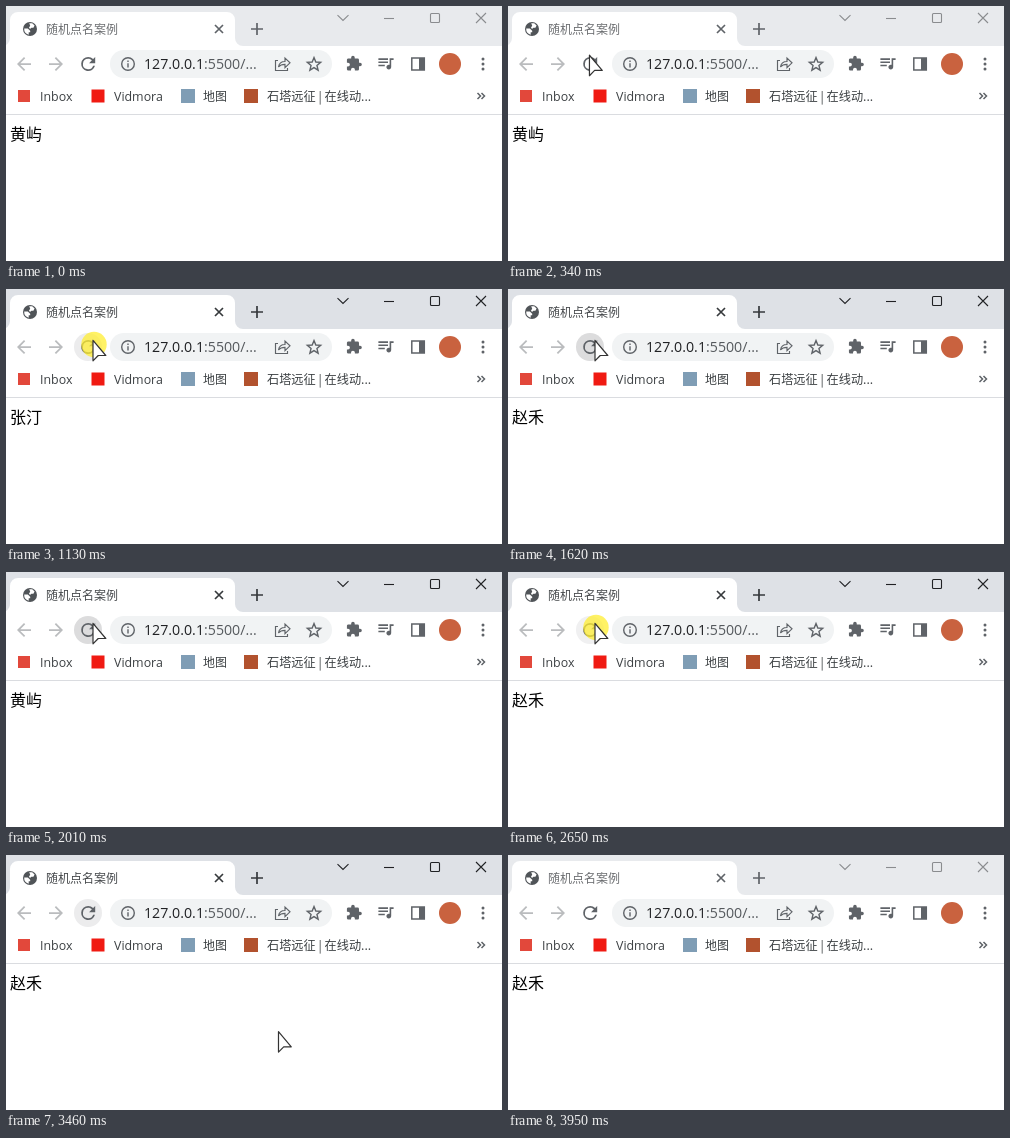
An HTML page that plays this animation: 496x255 px, repeating every 4010 ms.

```html
<!DOCTYPE html>
<html lang="zh">
<head>
<meta charset="utf-8">
<title>随机点名案例</title>
<style>
  html, body { margin: 0; width: 100%; height: 100%; overflow: hidden; background: #fff; }
  svg { display: block; }
  #stage { --strip: #e8eaed; --control: #8a8c8f; --label: #6b6d70; --tabicon: #5f6368; }
  #stage.focused { --strip: #dee1e6; --control: #202124; --label: #45484b; --tabicon: #36393c; }
  .strip { fill: var(--strip); }
  .control { stroke: var(--control); stroke-width: 1.1; }
  .tabicon { stroke: var(--tabicon); stroke-width: 1.7; }
  .line { fill: none; }
  .icon { fill: #5f6368; }
  .off { fill: #babcbe; }
  .outline { fill: none; stroke: #5f6368; stroke-width: 1.5; }
  .thin { stroke-width: 1.15; }
  text { font-family: "Open Sans", "Noto Sans CJK SC", "Noto Sans CJK", sans-serif; fill: #3c4043; }
  .cjk { font-family: "Noto Sans CJK SC", "Noto Sans CJK", sans-serif; }
  .bookmark { font-size: 12.4px; }
  .small { font-size: 12px; }
  #title { fill: var(--label); }
  #name { font-size: 16px; fill: #000; }
  .url { font-size: 14.2px; fill: #202124; }
  .url tspan { fill: #55595d; }
</style>
</head>
<body>
<svg id="stage" width="496" height="255" viewBox="0 0 496 255">
  <rect width="496" height="255" fill="#fff"/>

  <!-- tab strip -->
  <rect class="strip" width="496" height="40"/>
  <path fill="#fff" d="M-4 40A8 8 0 0 0 4 32V14A8 8 0 0 1 12 6H221A8 8 0 0 1 229 14V32A8 8 0 0 0 237 40Z"/>
  <g id="globe">
    <circle cx="24" cy="23" r="7" fill="#505458"/>
    <path fill="#fff" d="M18.2 22.500h3.600l2.400 2.200v1.600h-1.500v2.400a6 6 0 0 1-4.500-6.200zM23.200 17.300h3l2.400 2.200-1.200 2.200h-2l-1.400 1.200-1-1.400 1.200-1.800z"/>
  </g>
  <path id="spinner" class="outline" d="M24 16.500A6.500 6.500 0 1 1 17.500 23"/>
  <text id="title" class="cjk small" x="40" y="27.500">随机点名案例</text>
  <g class="line tabicon">
    <path d="M209 19l8 8m0-8l-8 8"/>
    <path d="M245 23h12m-6-6v12"/>
  </g>
  <g class="line control">
    <path d="M331.500 9.200l5.500 5.300 5.500-5.300"/>
    <path d="M378 12.500h10"/>
    <rect x="424.500" y="7.500" width="9" height="9" rx="1"/>
    <path d="M470 7l10 10m0-10l-10 10"/>
  </g>

  <!-- toolbar -->
  <path class="off" transform="translate(7.5 47.5) scale(.875)" d="M20 11H7.83l5.59-5.59L12 4l-8 8 8 8 1.41-1.41L7.83 13H20z"/>
  <path class="off" transform="translate(60.5 47.5) scale(-.875 .875)" d="M20 11H7.83l5.59-5.59L12 4l-8 8 8 8 1.41-1.41L7.83 13H20z"/>
  <circle id="hover" cx="82" cy="58" r="14"/>
  <path class="icon" transform="translate(71.7 47.5) scale(.875)" d="M17.65 6.35A7.958 7.958 0 0 0 12 4a8 8 0 1 0 7.73 10h-2.08A6 6 0 1 1 12 6c1.66 0 3.14.69 4.22 1.78L13 11h7V4z"/>
  <rect x="104" y="44" width="222" height="28" rx="14" fill="#f1f3f4"/>
  <path class="icon" transform="translate(113.6 49.6) scale(.7)" d="M11 7h2v2h-2zm0 4h2v6h-2zm1-9a10 10 0 1 0 0 20 10 10 0 0 0 0-20zm0 18a8 8 0 1 1 0-16 8 8 0 0 1 0 16z"/>
  <text class="url" x="138" y="63">127.0.0.1<tspan>:5500/...</tspan></text>
  <g class="outline thin">
    <path d="M272 54.5h-2.500v10h12v-2.500"/>
    <path d="M272.500 61c.6-3.800 3-5.500 6.500-5.500v-3.500l5 4.800-5 4.800v-3.300c-3 0-5 .7-6.500 2.700z"/>
  </g>
  <path id="star" class="outline" style="stroke-width:1.4"/>
  <path class="icon" transform="translate(339.5 49) scale(.71)" d="M20.5 11H19V7a2 2 0 0 0-2-2h-4V3.5a2.5 2.5 0 0 0-5 0V5H4c-1.1 0-2 .9-2 2v3.8h1.5a2.7 2.7 0 0 1 0 5.4H2V20a2 2 0 0 0 2 2h3.8v-1.5a2.7 2.7 0 0 1 5.4 0V22H17a2 2 0 0 0 2-2v-4h1.5a2.5 2.5 0 0 0 0-5z"/>
  <path class="icon" transform="translate(370 47.5) scale(.8)" d="M15 6H3v2h12V6zm0 4H3v2h12v-2zM3 16h8v-2H3v2zM17 6v8.18c-.31-.11-.65-.18-1-.18-1.66 0-3 1.34-3 3s1.34 3 3 3 3-1.34 3-3V8h3V6h-5z"/>
  <rect class="outline" x="405.8" y="52" width="12.5" height="12"/>
  <path class="icon" d="M413 52h5.5v12h-5.5z"/>
  <circle cx="444" cy="58" r="11" fill="#c9623f"/>
  <g class="icon">
    <circle cx="477" cy="53" r="1.5"/><circle cx="477" cy="58" r="1.5"/><circle cx="477" cy="63" r="1.5"/>
  </g>

  <!-- bookmarks -->
  <rect x="12" y="84" width="12" height="12" fill="#e2483b"/>
  <text class="bookmark" x="34" y="95">Inbox</text>
  <rect x="85.5" y="83.5" width="13" height="13" fill="#f01a12"/>
  <text class="bookmark" x="108" y="95">Vidmora</text>
  <rect x="175" y="83" width="14" height="14" fill="#7f9db5"/>
  <text class="cjk small" x="197" y="95">地图</text>
  <rect x="238" y="83" width="14" height="14" fill="#b2522e"/>
  <text class="cjk" font-size="12.2" x="261" y="95">石塔远征 | 在线动...</text>
  <path class="outline" d="M471.500 87l3 3-3 3m4-6l3 3-3 3"/>
  <path d="M0 108.500h496" stroke="#dadce0"/>

  <!-- page -->
  <text id="name" class="cjk" x="4" y="133.700"></text>

  <circle id="press" cx="88" cy="55.500" r="12.700" fill="#ffee32" fill-opacity=".75"/>
  <path id="cursor" fill="#fff" stroke="#333" stroke-width="1.200" stroke-linejoin="round" d="M0 0V20.500L5.200 15.200H12.800Z"/>
</svg>
<script>
const LOOP = 4010;
const FIRST_NAME = '黄屿';
// down: button pressed, done: page reloaded with a newly picked name
const clicks = [
  { down: 650, done: 830, name: '张汀' },
  { down: 1070, done: 1230, name: '赵禾' },
  { down: 1440, done: 1600, name: '赵禾' },
  { down: 1780, done: 1980, name: '黄屿' },
  { down: 2210, done: 2410, name: '赵禾' },
  { down: 2650, done: 2860, name: '张汀' },
  { down: 3050, done: 3250, name: '赵禾' }
];
const $ = id => document.getElementById(id);
const [stage, globe, spinner, hover, nameText, press, cursor] =
  ['stage', 'globe', 'spinner', 'hover', 'name', 'press', 'cursor'].map($);

const clamp = v => Math.min(1, Math.max(0, v));
const mix = (a, b, p) => a + (b - a) * p;
const progress = (t, from, to) => clamp((t - from) / (to - from));
const show = (el, on) => el.setAttribute('visibility', on ? 'visible' : 'hidden');

const starPoints = Array.from({ length: 10 }, (_, i) => {
  const r = i % 2 ? 3.1 : 7, a = i * Math.PI / 5;
  return [308 + r * Math.sin(a), 58.5 - r * Math.cos(a)].map(v => v.toFixed(2)).join(' ');
});
$('star').setAttribute('d', 'M' + starPoints.join('L') + 'Z');

const ENTRY = [329, 190], OVERSHOOT = [76, 48], BUTTON = [87, 51.3], EXIT = [316, 206];

function cursorAt(t) {
  const along = (a, b, px, py = px) => [mix(a[0], b[0], px), mix(a[1], b[1], py)];
  if (t < 430) {
    // vertical travel settles a little sooner, which bends the path
    const rest = 1 - progress(t, 110, 430);
    return along(ENTRY, OVERSHOOT, 1 - rest ** 3, 1 - rest ** 3.7);
  }
  if (t < 3290) return along(OVERSHOOT, BUTTON, progress(t, 430, 540));
  return along(BUTTON, EXIT, progress(t, 3290, 3480) ** 2);
}

function hoverShade(t, down) {
  const dark = progress(t, down + 50, down + 110) * (1 - progress(t, 3340, 3490));
  const grey = Math.round(mix(240, 220, dark));
  return `rgb(${grey}, ${grey}, ${grey + 1})`;
}

function render(t) {
  const click = clicks.filter(c => c.down <= t).pop();
  const loaded = clicks.filter(c => c.done <= t).pop();
  const loading = !!click && t >= click.done - 65 && t < click.done;

  stage.classList.toggle('focused', t >= 650 && t < 3950);
  nameText.textContent = loaded ? loaded.name : FIRST_NAME;
  show(globe, !loading);
  show(spinner, loading);
  spinner.setAttribute('transform', `rotate(${t * 0.4 % 360} 24 23)`);
  show(press, !!click && t < click.down + 85);
  show(hover, !!click && t < 3740);
  if (click) hover.setAttribute('fill', hoverShade(t, click.down));
  show(cursor, t >= 110 && t < 3500);
  cursor.setAttribute('transform', `translate(${cursorAt(t)})`);
}

const start = performance.now();
function tick() {
  render((performance.now() - start) % LOOP);
  requestAnimationFrame(tick);
}
tick();
</script>
</body>
</html>
```
